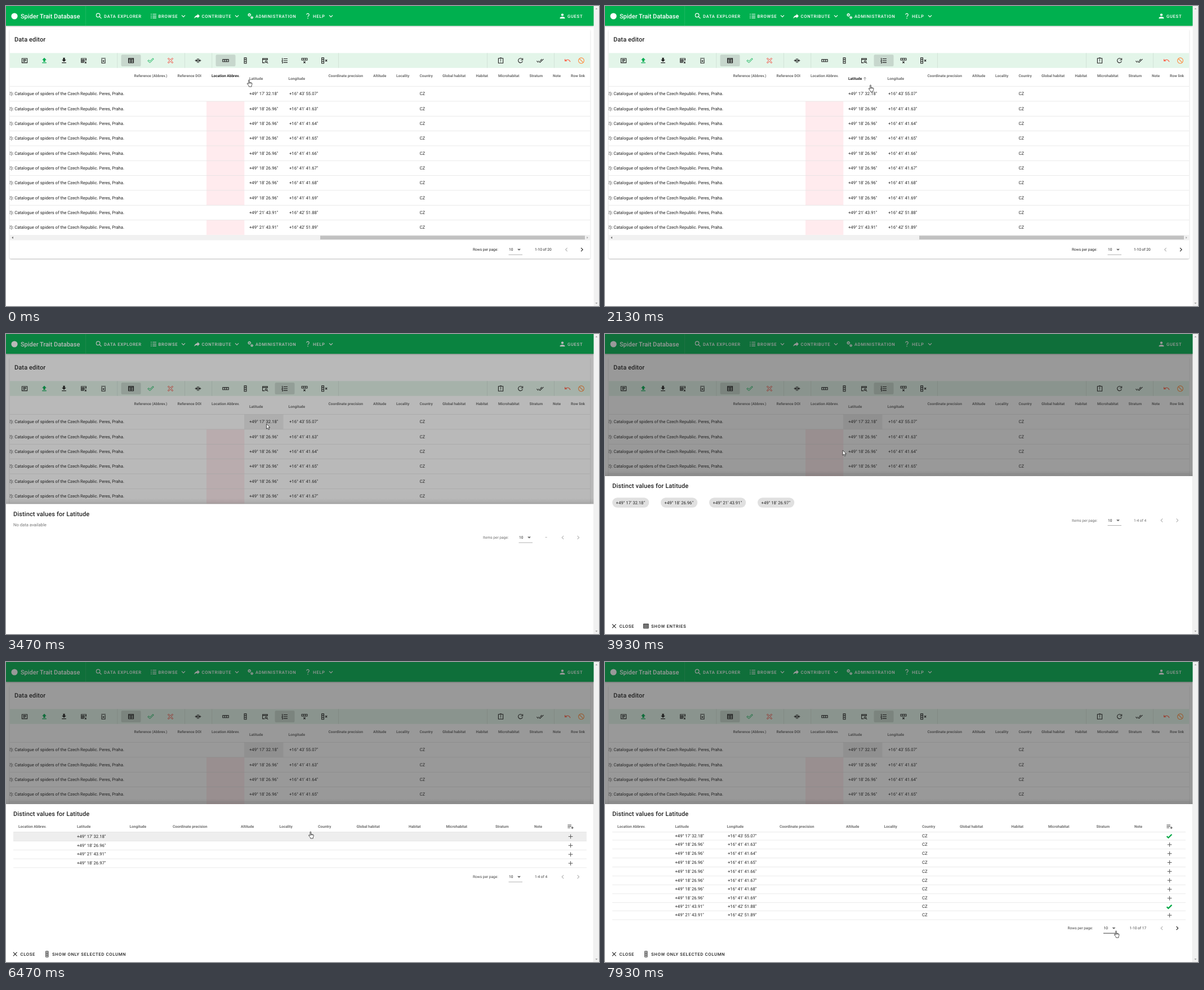
An HTML page that plays this animation: 1053x532 px, repeating every 8000 ms.

```html
<!DOCTYPE html>
<html lang="en">
<head>
<meta charset="utf-8">
<title>Data editor</title>
<style>
html, body { margin: 0; width: 100%; height: 100%; overflow: hidden; background: #fff; }
svg { display: block; width: 1053px; height: 532px; font-family: Roboto, sans-serif; }
text { white-space: pre; text-rendering: geometricPrecision; }
</style>
</head>
<body>
<svg id="stage" viewBox="0 0 1053 532"></svg>
<script>
const UNIT = 0.5484; // page pixels to stage pixels
const BODY = 14 * UNIT, SMALL = 12 * UNIT, TITLE = 20 * UNIT;
const INK = '#212121', GREY = '#6c6c6c', GREEN = '#00b04f', LINE = '#dfdfdf';
const WIDTH = 1043.7; // page width without the scrollbar

const strokes = {
  search: 'M14.5 14.5L20 20M15.5 9.5a6 6 0 1 1-12 0a6 6 0 1 1 12 0',
  list: 'M3 6h3M9 6h12M3 12h3M9 12h12M3 18h3M9 18h12',
  down: 'M6.5 9.5l5.5 5.5 5.5-5.5',
  left: 'M14.5 6.5L9 12l5.5 5.5',
  right: 'M9.5 6.5L15 12l-5.5 5.5',
  help: 'M8 8a4 4 0 1 1 6 3.4c-1.4.8-2 1.6-2 3.1M12 17.5v3',
  card: 'M3.5 5h17v14h-17zM7 9h10M7 12h10M7 15h7',
  tableX: 'M20 12V5H4v13h9M4 9.5h16M4 13.5h12M10 7v11M15.5 16l5 5M20.5 16l-5 5',
  trash: 'M6.5 7v13h11V7M5 4.5h14M10 11l4 5M14 11l-4 5',
  table: 'M4 5h16v14H4zM4 8h16M4 13.5h16M12 8v11',
  grid: 'M4 5h16v14H4zM4 7h16M4 11h16M4 15h16M9 7v12M15 7v12',
  collapse: 'M10 5v14M14 5v14M2 12h6M5 9l3 3-3 3M22 12h-6M19 9l-3 3 3 3',
  row: 'M2.5 8.5h19v7h-19zM9 8.5v7M15 8.5v7',
  column: 'M8.5 3h7v18h-7zM8.5 9h7M8.5 15h7',
  tableFind: 'M20 10V5H4v14h7M4 8h16M18.5 15a3 3 0 1 1-6 0a3 3 0 1 1 6 0M18 17.5l3.5 3.5',
  numbered: 'M8 6h13M8 12h13M8 18h13M4 3.5v5M3 10.5h2l-2 3h2M3 16h2v4H3',
  rowX: 'M3 4.5h18v6H3zM9 4.5v6M15 4.5v6M9 14.5l6 6M15 14.5l-6 6',
  columnX: 'M4 3h7v18H4zM4 9h7M4 15h7M15.5 9l6 6M21.5 9l-6 6',
  clipboard: 'M4.5 4.5h15v15.5h-15zM9 3.5h6M12 8v5M12 15v2',
  refresh: 'M17.5 7A7.2 7.2 0 1 0 19 14M19.5 4v6h-6',
  checks: 'M1 13l5 5M6.5 13l5 5L23 7M12 13l5.5-6',
  undo: 'M4 7v6h6M4.5 12.5C9 7.5 18 7.5 21 16',
  cancel: 'M21 12a9 9 0 1 1-18 0a9 9 0 1 1 18 0M6 6l12 12',
  addAll: 'M3 6h12M3 10.5h12M3 15h8M18 11v8M14 15h8',
  plus: 'M12 5v14M5 12h14',
  cross: 'M6 6l12 12M18 6L6 18',
  up: 'M12 20V5M6 11l6-6 6 6',
  tick: 'M4 13l5 5L20 7',
  tickOutline: 'M2.5 13l3-3 4 4L19 4.5 21.5 7 9.5 19z',
  crossOutline: 'M6 3.5l6 6 6-6L20.5 6l-6 6 6 6-2.5 2.5-6-6-6 6L3.5 18l6-6-6-6z'
};
const fills = {
  share: 'M21 12l-7-7v4C7 10 4 15 3 20c2.5-3.5 6-5.1 11-5.1V19z',
  user: 'M12 4a4 4 0 0 1 0 8a4 4 0 0 1 0-8M12 14c4.4 0 8 1.8 8 4v2H4v-2c0-2.2 3.6-4 8-4z',
  upload: 'M9 16v-6H5l7-7 7 7h-4v6zM5 18h14v2H5z',
  download: 'M9 3v6H5l7 7 7-7h-4V3zM5 18h14v2H5z',
  caret: 'M6.5 9.5l5.5 5.5 5.5-5.5z'
};

function icon(x, y, name, color = INK, width = 2, size = UNIT) {
  const paint = fills[name] ? `fill="${color}"` : `fill="none" stroke="${color}" stroke-width="${width}"`;
  return `<path transform="translate(${x} ${y}) scale(${size}) translate(-12 -12)" d="${fills[name] || strokes[name]}" ${paint}/>`;
}
// y is the vertical middle of the line of text
function text(x, y, str, size = BODY, color = INK, attrs = '') {
  return `<text x="${x}" y="${(y + size * 0.355).toFixed(2)}" font-size="${size}" fill="${color}" ${attrs}>${str}</text>`;
}
const rect = (x, y, w, h, fill, attrs = '') =>
  `<rect x="${x}" y="${y}" width="${w}" height="${h}" fill="${fill}" ${attrs}/>`;
const hline = (x1, x2, y, color = LINE) => rect(x1, y - 0.3, x2 - x1, 0.65, color);
const group = (id, body, attrs = '') => `<g id="${id}" ${attrs}>${body}</g>`;
const button = (x, y, str, color = INK) =>
  text(x, y, str, BODY, color, 'font-weight="500" letter-spacing=".0892em"');
const head = (x, y, str, attrs = '') => text(x, y, str, SMALL, GREY, `font-weight="700" ${attrs}`);
const title = (x, y, str) => text(x, y, str, TITLE, INK, 'font-weight="500" letter-spacing=".0125em"');

function footer(y, dx, label, count, prevX, more, color = INK) {
  return text(829 + dx, y, label, SMALL, color) + text(893 + dx, y, '10', SMALL) +
    icon(911 + dx, y, 'caret', '#666') + hline(892.5 + dx, 917 + dx, y + 9, '#888') +
    text(939 + dx, y, count, SMALL, color) +
    icon(prevX, y, 'left', '#b5b5b5') + icon(prevX + 27.2, y, 'right', more ? INK : '#b5b5b5');
}

// main page
const lats = ['17\' 32.18"', ...Array(7).fill('18\' 26.96"'), '21\' 43.91"', '21\' 43.91"'].map(s => '+49° ' + s);
const lngs = ['43\' 55.07"', ...Array.from({ length: 7 }, (_, i) => `41' 41.6${i + 3}"`),
  '42\' 51.88"', '42\' 51.89"'].map(s => '+16° ' + s);
const TOP = 142.6, STEP = 26.33;

function appBar() {
  const items = [['search', 165, 'DATA EXPLORER', 174], ['list', 262, 'BROWSE', 270.5, 315],
    ['share', 339, 'CONTRIBUTE', 347.5, 410], ['', 434, 'ADMINISTRATION', 443],
    ['help', 536, 'HELP', 545, 577], ['user', 988, 'GUEST', 997]];
  const cog = (x, y, r) => `<circle cx="${x}" cy="${y}" r="${r}" fill="none" stroke="#fff" stroke-width="1.3"/>` +
    `<circle cx="${x}" cy="${y}" r="${r + 0.9}" fill="none" stroke="#fff" stroke-width=".8" stroke-dasharray="1.1 1.1"/>`;
  return rect(0, 0, WIDTH, 35.1, GREEN, 'filter="url(#shadow)"') +
    rect(141, 0, 0.6, 35.1, '#2dbd6d') + '<circle cx="15" cy="18" r="5.6" fill="#fff"/>' +
    text(26, 17.8, 'Spider Trait Database', TITLE, '#fff', 'font-weight="500"') +
    items.map(([name, ix, label, x, chevron]) =>
      (name ? icon(ix, 17.8, name, '#fff', 2.1) : cog(432.2, 15.8, 1.8) + cog(436.6, 20.4, 1.3)) +
      button(x, 17.8, label, '#fff') + (chevron ? icon(chevron, 17.8, 'down', '#fff') : '')).join('');
}

function toolbar() {
  const tools = [['card', 33], ['upload', 68, '#00ab50'], ['download', 103], ['tableX', 138], ['trash', 173],
    ['table', 222, INK, 2.4], ['tickOutline', 257, '#00b04f', 1.8], ['crossOutline', 292, '#f44336', 1.8],
    ['collapse', 341], ['row', 390], ['column', 425], ['tableFind', 460], ['numbered', 495],
    ['rowX', 530], ['columnX', 565], ['clipboard', 878.5], ['refresh', 913.5], ['checks', 948.5],
    ['undo', 997, '#ff5a40'], ['cancel', 1021.5, '#ff8b3d']];
  return rect(6.6, 83.4, 1030.6, 26.4, '#e3f5e9') +
    [197.5, 317, 365.5, 590, 854, 973].map(x => rect(x, 83.4, 0.6, 26.4, '#c8d8ce')).join('') +
    rect(204.5, 86.3, 35, 20.6, '#c7d7cd', 'rx="2.2"') +
    rect(372.5, 86.3, 35, 20.6, '#c7d7cd', 'rx="2.2" id="active"') +
    tools.map(([name, x, color, w]) => icon(x, 96.8, name, color, w)).join('');
}

function mainTable() {
  const heads = { 'Reference (Abbrev.)': 227.5, 'Reference DOI': 304.5, 'Coordinate precision': 572.5,
    'Altitude': 652, 'Locality': 693, 'Country': 734.5, 'Global habitat': 775, 'Habitat': 834.5,
    'Microhabitat': 874, 'Stratum': 929.5, 'Note': 971, 'Row link': 1003 };
  let out = Object.entries(heads).map(([s, x]) => head(x, 124, s)).join('') +
    head(365, 124, 'Location Abbrev.', 'id="locationHead"') +
    head(432, 129, 'Latitude', 'id="latitudeHead"') + head(501.5, 129, 'Longitude') +
    group('sortArrow', icon(461.5, 129, 'up', '#777', 2, 0.38)) +
    rect(6.6, TOP, 1030.6, STEP, '#eeeeee', 'id="rowHover"') +
    rect(423, TOP, 69.5, STEP, '#bdbdbd', 'id="cell"');
  lats.forEach((lat, i) => {
    const y = TOP + STEP * i, mid = y + 12.9;
    if (i && i !== 8) out += rect(356, y, 67.3, STEP, '#ffebee');
    out += hline(6.6, 1037.2, y) +
      text(210, mid, '(2002): Catalogue of spiders of the Czech Republic. Peres, Praha.', BODY, INK,
        'text-anchor="end" clip-path="url(#cardClip)"') +
      text(432, mid, lat) + text(503, mid, lngs[i]) + text(734.5, mid, 'CZ');
  });
  return out + rect(6.6, 406, 1030.6, 9.4, '#f1f1f1') + rect(558, 407.4, 470, 6.7, '#c1c1c1') +
    '<path d="M12.6 408.8v4l-2.2-2z" fill="#505050"/><path d="M1031.4 408.8v4l2.2-2z" fill="#a3a3a3"/>' +
    footer(432, 0, 'Rows per page:', '1-10 of 20', 995.3, true);
}

// bottom sheet
const sheetHeads = ['Location Abbrev.', 'Latitude', 'Longitude', 'Coordinate precision', 'Altitude', 'Locality',
  'Country', 'Global habitat', 'Habitat', 'Microhabitat', 'Stratum', 'Note'];
const distinct = [lats[0], lats[1], lats[8], '+49° 18\' 26.97"'];

function sheetTable(xs, rows, short) {
  let y = 301.5, out = sheetHeads.map((s, i) => head(xs[i], 292, s)).join('') +
    icon(1002.3, 292.3, 'addAll', '#444', 1.8);
  rows.forEach(([lat, lng], i) => {
    const done = short.includes(i), h = done ? 14.4 : 15.83, mid = y + (done ? 6.6 : 7.6);
    out += hline(13, 1031, y) + text(xs[1], mid, lat);
    if (lng) out += text(xs[2] + 1.5, mid, lng) + text(xs[6], mid, 'CZ');
    out += done ? icon(1002, mid + 0.3, 'tick', '#00a844', 4) : icon(1002.6, mid + 0.4, 'plus', '#555', 1.8);
    y += h;
  });
  return out + hline(13, 1031, y);
}

function sheet() {
  const narrow = [22, 126, 219.5, 296, 417, 485.5, 554, 622.5, 715, 781.5, 869, 938];
  const wide = [22, 124.5, 216.5, 310, 428, 495.5, 563, 630, 721.5, 787, 872.5, 940];
  const chips = distinct.map((s, i) =>
    rect(13 + 86 * i, 290.2, 65.2, 17.5, '#e0e0e0', 'rx="8.75"') + text(19.6 + 86 * i, 299, s)).join('');
  return rect(0, 242, WIDTH, 10, 'url(#edge)') + rect(0, 252, WIDTH, 280, '#fff') +
    title(13, 269.5, 'Distinct values for Latitude') +
    group('empty', text(13, 289, 'No data available', BODY, '#777') +
      footer(311.5, 18, 'Items per page:', '–', 988.8, false, GREY)) +
    group('chips', chips + footer(330.5, 0, 'Items per page:', '1-4 of 4', 988.8, false, GREY)) +
    group('few', rect(13, 301.5, 1018, 15.8, '#eeeeee', 'id="fewHover"') +
      sheetTable(narrow, distinct.map(lat => [lat]), []) +
      footer(381, 0, 'Rows per page:', '1-4 of 4', 988.8, false, '#444')) +
    group('many', rect(13, 0, 1018, 15.8, '#eeeeee', 'id="manyHover"') +
      sheetTable(wide, lats.map((lat, i) => [lat, lngs[i]]), [0, 8]) +
      footer(472, -7.5, 'Rows per page:', '1-10 of 17', 988.8, true, '#444') +
      group('selectHot', hline(885, 909.5, 481, '#222'))) +
    icon(16.2, 518, 'cross') + button(25.5, 518, 'CLOSE') +
    group('showEntries', rect(62, 508.2, 92, 19.7, '#f5f5f5', 'rx="2.2" id="buttonHot"') +
      icon(72.8, 518, 'grid', INK, 1.8) + button(82, 518, 'SHOW ENTRIES')) +
    group('showColumn', icon(72.8, 518, 'column') + button(82, 518, 'SHOW ONLY SELECTED COLUMN'));
}

const pointers =
  group('arrow', '<path d="M0 0v16l3.8-3.5 2.8 6 2.7-1.2-2.7-5.8h5z"/>') +
  group('hand', '<path d="M-1.5 1.5a1.5 1.5 0 0 1 3 0V8l6.5 1.5q2 .6 2 2.5-.2 4-1.8 6.5V22H0q-.3-2.4-2-4.5L-5.5 13Q-6.8 10.4-4 10.9L-1.5 13zM1.5 8v4M4.5 9v3M7.5 10v2"/>');

document.getElementById('stage').innerHTML =
  `<defs><clipPath id="cardClip"><rect x="6.6" y="0" width="1030" height="532"/></clipPath>
   <linearGradient id="edge" x2="0" y2="1"><stop stop-opacity="0"/><stop offset="1" stop-opacity=".1"/></linearGradient>
   <filter id="shadow" x="-5%" y="-10%" width="110%" height="130%">
   <feDropShadow dx="0" dy="1" stdDeviation="1.2" flood-opacity=".3"/></filter></defs>` +
  rect(0, 0, 1053, 532, '#fff') +
  rect(6.6, 41.7, 1030.6, 406, '#fff', 'rx="2" filter="url(#shadow)"') +
  appBar() + title(15, 59.3, 'Data editor') + toolbar() + mainTable() +
  group('tooltip', rect(412.5, 63.4, 165, 17.6, '#616161', 'rx="2.2" opacity=".9"') +
    text(495, 72.2, 'Show distinct values in selected column', BODY, '#fff', 'text-anchor="middle"')) +
  rect(0, 0, WIDTH, 532, '#212121', 'id="overlay"') + group('sheet', sheet()) +
  rect(WIDTH, 0, 9.3, 532, '#f1f1f1') +
  '<path d="M1046.4 5.8h4.2l-2.1-2.4zM1046.4 526h4.2l-2.1 2.4z" fill="#a3a3a3"/>' +
  group('pointer', pointers, 'fill="#fff" stroke="#111" stroke-width="1.3" stroke-linejoin="round"');

const el = {};
document.querySelectorAll('[id]').forEach(node => { el[node.id] = node; });
const set = (id, name, value) => el[id].setAttribute(name, value);
const show = (id, on) => set(id, 'display', on ? 'inline' : 'none');
const clamp = v => Math.max(0, Math.min(1, v));
const smooth = u => u * u * (3 - 2 * u);
const headColor = heat => `rgb(0 0 0 / ${0.58 + 0.3 * heat})`;

// points: [time, ...values]; ease shapes each leg
function track(t, points, ease = u => u) {
  let i = 1;
  while (i < points.length - 1 && t > points[i][0]) i++;
  const a = points[i - 1], b = points[i];
  const u = ease(clamp((t - a[0]) / (b[0] - a[0])));
  return a.slice(1).map((v, j) => v + (b[j + 1] - v) * u);
}

const legs = [
  [[0, 431.5, 131], [470, 495, 95]],
  [[1400, 495, 95], [1870, 485, 117], [2133, 471.5, 140], [2400, 458.5, 152]],
  [[2733, 458.5, 152], [2800, 459, 153.5], [3267, 459, 153.5], [3333, 462.5, 159.5]],
  [[3800, 462.5, 159.5], [4670, 199, 465], [5133, 130.5, 512.5]],
  [[5933, 130.5, 512.5], [6467, 541, 300.7], [6870, 1002, 288]],
  [[7130, 1002, 288], [7670, 905, 479.5], [7933, 907.5, 476.8]]
];
const shaped = legs.map(leg => leg.length === 2 ? smooth : u => u);

function pointerAt(t) {
  let i = legs.length - 1;
  while (i && t < legs[i][0][0]) i--;
  return track(t, legs[i], shaped[i]);
}

function render(t) {
  const [x, y] = pointerAt(t);
  const open = t > 3340, slide = clamp((t - 3335) / 300), shown = 1 - (1 - slide) ** 3;
  const view = t < 3860 ? 'empty' : t < 5990 ? 'chips' : t < 7130 ? 'few' : 'many';

  set('pointer', 'transform', `translate(${x} ${y}) scale(${UNIT})`);
  const onCell = !open && y > TOP;
  const onButton = view === 'chips' && y > 508 && x < 154;
  const hand = (!open && !onCell) || onButton || view === 'few' || view === 'many';
  show('hand', hand);
  show('arrow', !hand);

  set('active', 'x', t < 590 ? 372.5 : 477.5);
  set('tooltip', 'opacity', track(t, [[330, 0], [530, 1], [1400, 1], [1600, 0]])[0]);
  const [latitudeHeat] = track(t, [[0, 0], [130, 0.5], [400, 0], [1730, 0], [2000, 1], [2140, 1], [2400, 0]]);
  set('locationHead', 'fill', headColor(track(t, [[0, 1], [270, 0]])[0]));
  set('latitudeHead', 'fill', headColor(latitudeHeat));
  set('sortArrow', 'opacity', latitudeHeat);
  show('rowHover', onCell);
  show('cell', onCell || open);
  set('cell', 'fill', open ? '#eeeeee' : '#bdbdbd');

  show('overlay', open);
  set('overlay', 'opacity', 0.46 * (1 - (1 - slide) ** 2));
  show('sheet', open);
  set('sheet', 'transform', `translate(0 ${280 * (1 - shown)})`);
  for (const id of ['empty', 'chips', 'few', 'many']) show(id, id === view);
  show('showEntries', view === 'empty' || view === 'chips');
  show('showColumn', view === 'few' || view === 'many');
  show('buttonHot', onButton);

  const row = Math.floor((y - 300.5) / 15.6);
  show('fewHover', row >= 0 && row < 4);
  set('fewHover', 'y', 301.5 + 15.83 * row);
  show('manyHover', row >= 0 && row < 10 && y < 456);
  set('manyHover', 'y', 301.5 + 15.5 * row);
  show('selectHot', t > 7720);
}

function tick(now) {
  const step = Math.floor((now % 8000) * 0.015 + 0.06) % 120;
  render(step / 0.015);
  requestAnimationFrame(tick);
}
render(0);
requestAnimationFrame(tick);
</script>
</body>
</html>
```
